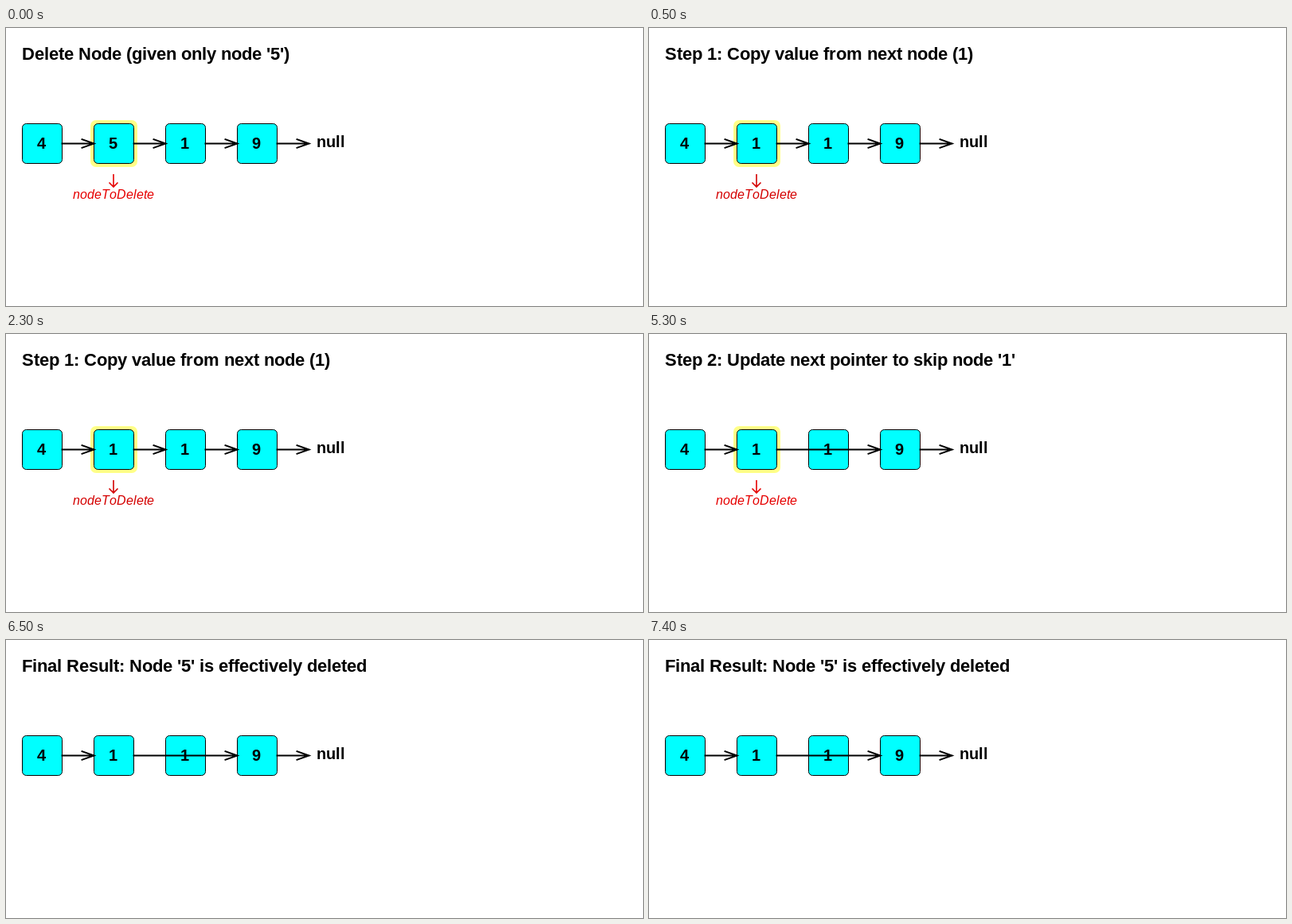
Write an HTML page that moves like this. It is 800 px wide and 350 px high and loops after 8 s.

```html
<!DOCTYPE html>
<html lang="en">
<head>
<meta charset="utf-8">
<title>Delete a linked list node</title>
<style>
  html, body { margin: 0; width: 100%; height: 100%; overflow: hidden; background: #fff; }
  svg { display: block; }
  text { white-space: pre; font-kerning: none; }
</style>
</head>
<body>
<svg id="stage" width="800" height="350" viewBox="0 0 800 350"></svg>
<script>
const LOOP = 8000;
const STEPS = [
  { at: 0, title: "Delete Node (given only node '5')", value: "5", red: "#e60000" },
  { at: 500, title: "Step 1: Copy value from next node (1)", value: "1", red: "#d40000" },
  { at: 3500, title: "Step 2: Update next pointer to skip node '1'", value: "1", red: "#e60000", skip: true },
  { at: 6500, title: "Final Result: Node '5' is effectively deleted", value: "1", skip: true, done: true }
];
const FAMILY = '"Liberation Sans", Arial, sans-serif';
const SIZE = 50, GAP = 90, TOP = 120, MID = 145.5;

const stage = document.getElementById("stage");
const pen = document.createElement("canvas").getContext("2d");

function add(parent, tag, attrs) {
  const node = document.createElementNS("http://www.w3.org/2000/svg", tag);
  for (const key in attrs) node.setAttribute(key, attrs[key]);
  parent.appendChild(node);
  return node;
}

// Places letters on whole pixels by rounding each advance.
function write(parent, str, x, y, style, size, fill = "#000") {
  const font = `${style} ${size}px ${FAMILY}`;
  pen.font = font;
  const xs = [];
  for (const ch of str) {
    xs.push(x);
    x += Math.round(pen.measureText(ch).width);
  }
  const node = add(parent, "text", { x: xs.join(" "), y, fill });
  node.style.font = font;
  node.textContent = str;
}

function box(parent, index, value) {
  const x = 20 + index * GAP;
  add(parent, "rect", {
    x: x + 0.5, y: TOP + 0.5, width: SIZE, height: SIZE, rx: 5,
    fill: "#0ff", stroke: "#000"
  });
  write(parent, value, x + 19, 152, "bold", 20);
}

function arrow(parent, from, to) {
  const a = from + 0.5, b = to + 0.5;
  add(parent, "path", {
    d: `M${a} ${MID}H${b}M${b - 15} ${MID - 5.3}L${b} ${MID}L${b - 15} ${MID + 5.3}`,
    fill: "none", stroke: "#000", "stroke-width": 2, "stroke-linecap": "square"
  });
}

function marker(parent, red) {
  add(parent, "path", {
    d: "M135 184V200M129.5 194.5L135 200L140.5 194.5",
    fill: "none", stroke: red, "stroke-width": 1.6
  });
  write(parent, "nodeToDelete", 84, 215, "italic", 16, red);
}

function build(step) {
  const g = add(stage, "g", { visibility: "hidden" });
  write(g, step.title, 20, 40, "bold", 22);
  if (!step.done) {
    add(g, "rect", { x: 106, y: 116, width: 59, height: 59, rx: 7, fill: "#ffff87" });
    marker(g, step.red);
  }
  ["4", step.value, "1", "9"].forEach((value, i) => box(g, i, value));
  arrow(g, 70, 110);
  if (step.skip) {
    arrow(g, 160, 290);
  } else {
    arrow(g, 160, 200);
    arrow(g, 250, 290);
  }
  arrow(g, 340, 380);
  write(g, "null", 390, 150, "bold", 20);
  return g;
}

const scenes = STEPS.map(build);
const start = performance.now();

function draw(now) {
  const t = Math.max(0, now - start) % LOOP;
  const current = STEPS.filter(s => s.at <= t).length - 1;
  scenes.forEach((g, i) => g.setAttribute("visibility", i === current ? "visible" : "hidden"));
  requestAnimationFrame(draw);
}
draw(start);
</script>
</body>
</html>
```
